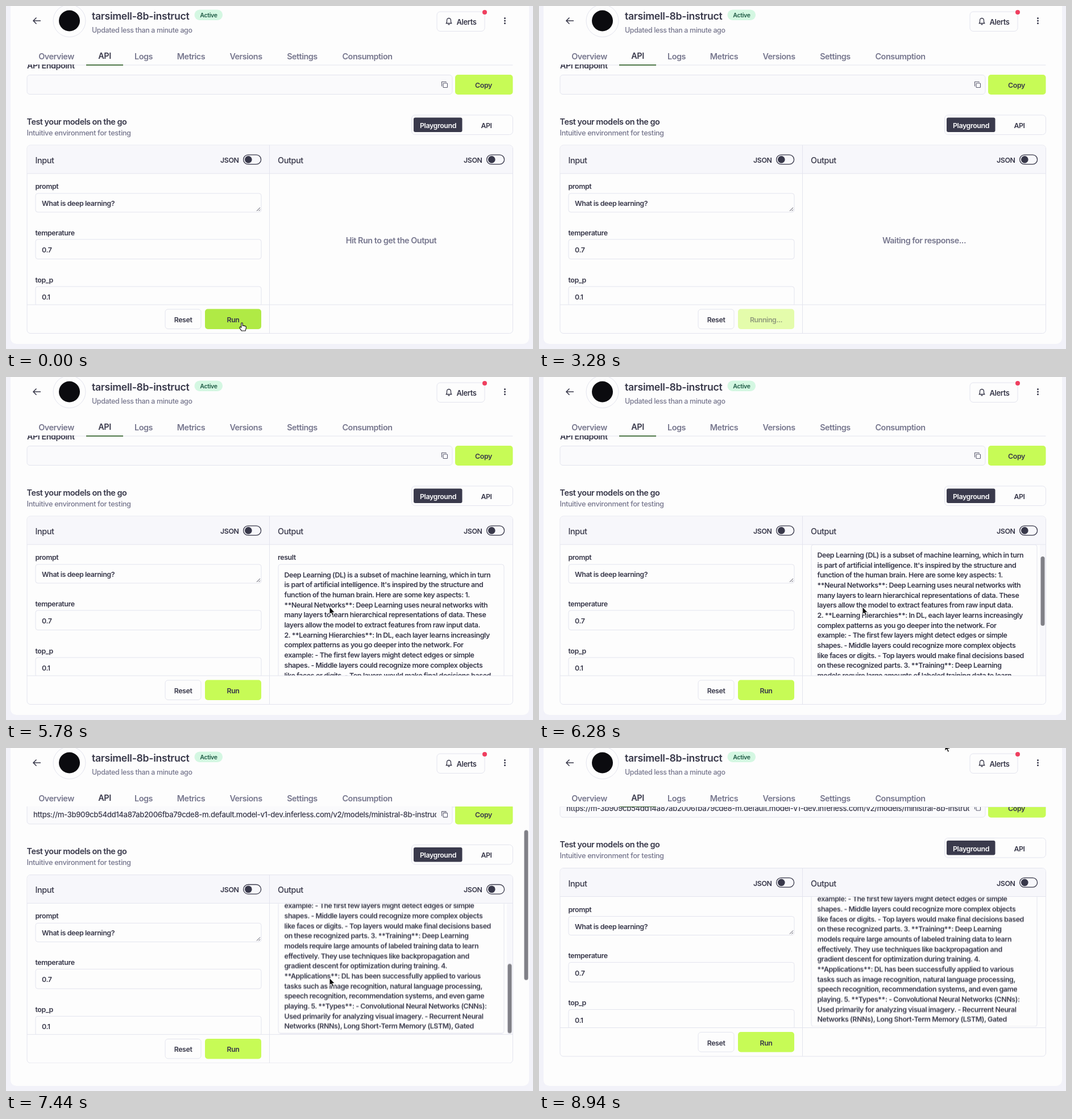
Recreate the animation shown at these times as an HTML page. Size 927 by 604 pixels, loop 9000 ms.

```html
<!DOCTYPE html>
<html lang="en">
<head>
<meta charset="utf-8">
<title>Model playground</title>
<style>
  html, body { margin: 0; width: 100%; height: 100%; overflow: hidden; background: #f2f2f9; }
  svg { display: block; width: 927px; height: 604px; }
  text { font: 580 12.4px Inter, sans-serif; letter-spacing: -.033em; fill: #38384a; dominant-baseline: central; }
  .mid { text-anchor: middle; }
  .big { font-size: 14.4px; }
  .soft { fill: #77778e; }
  .thin { font-weight: 450; letter-spacing: -.027em; }
  .bold { font-weight: 620; }
  .box { fill: #fdfdfd; stroke: #e3e4ee; }
  .band { fill: #f7f7fb; }
  .rule { stroke: #e3e4ee; fill: none; }
  .line { stroke: #38384a; fill: none; stroke-width: 1.3; }
  .lime { fill: #c7fb56; }
  .thumb { fill: #808087; }

  .scroll, .innerThumb, .page, .pageThumb, .innerBar, .pageBar, .cursor { animation: 9s linear infinite; }
  .idle, .wait, .done, .hand, .arrow, .url { animation: 9s step-end infinite; }
  .scroll { animation-name: scroll; }
  .innerThumb { animation-name: innerThumb; }
  .page { animation-name: page; }
  .pageThumb { animation-name: pageThumb; }
  .innerBar { animation-name: innerBar; }
  .pageBar { animation-name: pageBar; }
  .cursor { animation-name: cursor; }
  .idle, .hand { animation-name: idle; }
  .wait { animation-name: wait; }
  .done { animation-name: done; }
  .arrow { animation-name: arrow; }
  .url { animation-name: url; }

  @keyframes idle { 0% { visibility: visible } 6.667%, 100% { visibility: hidden } }
  @keyframes wait { 0% { visibility: hidden } 6.667% { visibility: visible } 43.78%, 100% { visibility: hidden } }
  @keyframes done { 0% { visibility: hidden } 43.78%, 100% { visibility: visible } }
  @keyframes arrow { 0% { visibility: hidden } 6.667%, 100% { visibility: visible } }
  @keyframes url { 0% { visibility: hidden } 81.1%, 100% { visibility: visible } }

  @keyframes scroll {
    0%, 66.1% { transform: translateY(0) }
    69.78% { transform: translateY(-34.7px) }
    76.56% { transform: translateY(-100px) }
    80.5%, 100% { transform: translateY(-190.5px) }
  }
  @keyframes innerThumb {
    0%, 66.1% { transform: translateY(0) }
    69.78% { transform: translateY(19px) }
    76.56% { transform: translateY(55px) }
    80.5%, 100% { transform: translateY(104.7px) }
  }
  @keyframes page {
    0%, 81.1% { transform: translateY(0); animation-timing-function: ease-out }
    84.5%, 100% { transform: translateY(-33.5px) }
  }
  @keyframes pageThumb {
    0%, 81.1% { transform: translateY(0); animation-timing-function: ease-out }
    84.5%, 100% { transform: translateY(18px) }
  }
  @keyframes innerBar { 0%, 65.9% { opacity: 0 } 66.2%, 84.2% { opacity: 1 } 86.4% { opacity: .12 } 87%, 100% { opacity: 0 } }
  @keyframes pageBar { 0%, 80.9% { opacity: 0 } 81.2%, 90% { opacity: 1 } 93%, 100% { opacity: 0 } }
  @keyframes cursor {
    0%, 11.5% { transform: translate(415px, 558px); animation-timing-function: ease-in-out }
    16.5%, 22% { transform: translate(451px, 545px); animation-timing-function: ease-in-out }
    28% { transform: translate(600px, -25px) }
    55.5% { transform: translate(640px, -25px); animation-timing-function: ease-out }
    64%, 84.7% { transform: translate(569px, 405px); animation-timing-function: ease-in-out }
    86% { transform: translate(640px, -25px) }
    97% { transform: translate(712px, -25px) }
    99.3%, 100% { transform: translate(714px, -8px) }
  }
</style>
</head>
<body>
<svg viewBox="0 0 927 604">
  <defs>
    <clipPath id="pageClip"><rect x="8" y="103.5" width="912" height="491.5"/></clipPath>
    <clipPath id="bodyClip"><rect x="37" y="295.5" width="855" height="230.5"/></clipPath>
    <clipPath id="urlClip"><rect x="40" y="121" width="717" height="35"/></clipPath>
    <g id="toggle">
      <rect class="line" x=".6" y=".6" width="31" height="16.6" rx="8.3"/>
      <circle cx="9.3" cy="8.9" r="6.3" fill="#38384a"/>
    </g>
  </defs>

  <rect width="927" height="604" fill="#f2f2f9"/>
  <rect x="8" y="-20" width="912" height="615" rx="10" fill="#fdfdfd"/>

  <path class="rule" d="M36.5 104H891.5"/>
  <rect x="141" y="103" width="65" height="1.8" fill="#3d6a35"/>
  <g clip-path="url(#pageClip)">
    <g class="page">
      <text class="big" x="37" y="104">API Endpoint</text>
      <rect class="box" x="37" y="121.5" width="748" height="34" rx="5" style="fill:#fafafc"/>
      <g clip-path="url(#urlClip)" class="url">
        <text class="thin" x="48" y="139" style="font-size:13.1px">https://m-3b909cb54dd14a87ab2006fba79cde8-m.default.model-v1-dev.inferless.com/v2/models/ministral-8b-instruct</text>
      </g>
      <g class="line" style="stroke:#5d5d70;stroke-width:1.1">
        <rect x="769" y="136" width="7.5" height="7.5" rx="1"/>
        <path d="M767 141h-.5v-7.5h7.5v1"/>
      </g>
      <rect class="lime" x="790" y="121" width="101.5" height="35" rx="5"/>
      <text class="mid bold" x="840" y="139.5">Copy</text>

      <text class="big" x="36.5" y="203">Test your models on the go</text>
      <text class="soft thin" x="36.5" y="223" style="font-size:12.8px">Intuitive environment for testing</text>
      <rect class="box" x="713.5" y="192" width="178" height="34.5" rx="6"/>
      <rect x="717" y="196.5" width="85.5" height="25.5" rx="3" fill="#3a3a4c"/>
      <text class="mid" x="760" y="210.5" style="fill:#fff">Playground</text>
      <text class="mid" x="845" y="210.5">API</text>

      <rect class="box" x="37" y="245" width="854.5" height="331.5" rx="6"/>
      <path class="band" d="M37.5 295V251q0-5.5 5.5-5.5h842.5q5.5 0 5.5 5.5v44z"/>
      <text class="big thin" x="51.5" y="271.5">Input</text>
      <text class="big thin" x="478" y="271.5">Output</text>
      <text x="377" y="271.5">JSON</text>
      <text x="805" y="271.5">JSON</text>
      <use href="#toggle" x="417" y="261.5"/>
      <use href="#toggle" x="845" y="261.5"/>

      <g clip-path="url(#bodyClip)">
        <text x="51.5" y="317.5">prompt</text>
        <rect class="box" x="52" y="330" width="397" height="33" rx="4"/>
        <path d="M441 361l6-6M444.5 361l2.5-2.5" class="line" style="stroke-width:.9"/>
        <text x="63" y="347.5">What is deep learning?</text>
        <text x="51.5" y="399">temperature</text>
        <rect class="box" x="52" y="411" width="397" height="34.5" rx="4"/>
        <text x="63" y="429.5">0.7</text>
        <text x="51.5" y="482">top_p</text>
        <rect class="box" x="52" y="494" width="397" height="34.5" rx="4"/>
        <text x="63" y="512.5">0.1</text>

        <text class="mid big soft idle" x="677.5" y="412">Hit Run to get the Output</text>
        <text class="mid big soft wait" x="677.5" y="412">Waiting for response...</text>
        <g class="done">
          <g class="scroll">
            <text x="478" y="317.5">result</text>
            <rect class="box" x="479" y="330" width="397" height="384.5" rx="4"/>
            <text id="answer"></text>
          </g>
          <g class="innerBar">
            <rect x="881" y="295.5" width="10" height="230" fill="#f7f7fb"/>
            <rect class="thumb innerThumb" x="882.5" y="297" width="7" height="122" rx="3.5"/>
          </g>
        </g>
      </g>

      <path class="rule" d="M37 295H891.5M37 526H891.5M463.5 245V576.5"/>
      <rect class="box" x="280" y="534" width="63" height="34.5" rx="5"/>
      <text class="mid" x="311.5" y="552.5">Reset</text>
      <g class="idle">
        <rect x="350" y="533.5" width="99" height="35.5" rx="5" fill="#b0ea45"/>
        <text class="mid bold" x="399.5" y="552.5">Run</text>
      </g>
      <g class="wait">
        <rect x="350" y="533.5" width="99" height="35.5" rx="5" fill="#e4fcab"/>
        <text class="mid" x="399.5" y="552.5" style="fill:#8f9a7c">Running...</text>
      </g>
      <g class="done">
        <rect class="lime" x="350" y="533.5" width="99" height="35.5" rx="5"/>
        <text class="mid bold" x="399.5" y="552.5">Run</text>
      </g>
    </g>
    <g class="pageBar">
      <rect class="thumb pageThumb" x="911.5" y="133" width="7" height="264" rx="3.5"/>
    </g>
  </g>

  <path class="line" d="M61 26H48M53.5 20.5L48 26l5.5 5.5" style="stroke-width:1.5"/>
  <circle class="box" cx="111.5" cy="26" r="28.5"/>
  <circle cx="111.5" cy="26" r="18.5" fill="#0b0b0f"/>
  <text x="151" y="17.5" style="font-size:17.7px;letter-spacing:-.018em">tarsimell-8b-instruct</text>
  <rect x="331.5" y="6.5" width="49.5" height="18.5" rx="9" fill="#d4f7e2"/>
  <text class="mid" x="356.5" y="16.5" style="font-size:10.6px;fill:#1f5a45">Active</text>
  <text class="soft thin" x="151" y="42">Updated less than a minute ago</text>

  <rect class="box" x="758" y="10" width="84" height="34.5" rx="6"/>
  <path class="line" d="M774.5 30.5c1.5-2 1-3.5 1-5.5a3.5 3.5 0 0 1 7 0c0 2-.5 3.5 1 5.5zM777.5 32.5h3"/>
  <text x="792.5" y="28" style="font-size:13px">Alerts</text>
  <circle cx="842" cy="11" r="4" fill="#ef3f5f"/>
  <g fill="#38384a">
    <circle cx="877.5" cy="21.5" r="1.5"/>
    <circle cx="877.5" cy="26" r="1.5"/>
    <circle cx="877.5" cy="30.5" r="1.5"/>
  </g>

  <g class="mid">
    <text class="big soft" x="88.5" y="88">Overview</text>
    <text class="big" x="173.5" y="87">API</text>
    <text class="big soft" x="242" y="88">Logs</text>
    <text class="big soft" x="325.5" y="88">Metrics</text>
    <text class="big soft" x="422" y="88">Versions</text>
    <text class="big soft" x="521" y="88">Settings</text>
    <text class="big soft" x="635.5" y="88">Consumption</text>
  </g>

  <g class="cursor">
    <path class="arrow" d="M0 0V13L3 10.3 5.2 15.3 7.5 14.3 5.3 9.5H9.3z" fill="#111" stroke="#fff" stroke-width=".9"/>
    <path class="hand" d="M-1.2 8V1.2q0-1.4 1.2-1.4t1.2 1.4V5q1.6-1 2.4.4 1.5-.7 2.2.5 1.6-.3 1.6 1.5c0 3-.8 4-1.3 6.6H-.8C-2 11.5-4 10-4.2 8.3c0-1.6 1.8-1.5 3-.3z" fill="#fff" stroke="#111" stroke-width="1.1"/>
  </g>
</svg>
<script>
  const answerLines = [
    "Deep Learning (DL) is a subset of machine learning, which in turn",
    "is part of artificial intelligence. It's inspired by the structure and",
    "function of the human brain. Here are some key aspects: 1.",
    "**Neural Networks**: Deep Learning uses neural networks with",
    "many layers to learn hierarchical representations of data. These",
    "layers allow the model to extract features from raw input data.",
    "2. **Learning Hierarchies**: In DL, each layer learns increasingly",
    "complex patterns as you go deeper into the network. For",
    "example: - The first few layers might detect edges or simple",
    "shapes. - Middle layers could recognize more complex objects",
    "like faces or digits. - Top layers would make final decisions based",
    "on these recognized parts. 3. **Training**: Deep Learning",
    "models require large amounts of labeled training data to learn",
    "effectively. They use techniques like backpropagation and",
    "gradient descent for optimization during training. 4.",
    "**Applications**: DL has been successfully applied to various",
    "tasks such as image recognition, natural language processing,",
    "speech recognition, recommendation systems, and even game",
    "playing. 5. **Types**: - Convolutional Neural Networks (CNNs):",
    "Used primarily for analyzing visual imagery. - Recurrent Neural",
    "Networks (RNNs), Long Short-Term Memory (LSTM), Gated"
  ];
  const answer = document.getElementById("answer");
  answerLines.forEach((line, i) => {
    const span = document.createElementNS(answer.namespaceURI, "tspan");
    span.setAttribute("x", 489.5);
    span.setAttribute("y", 347.8 + i * 17.67);
    span.textContent = line;
    answer.append(span);
  });
</script>
</body>
</html>
```
